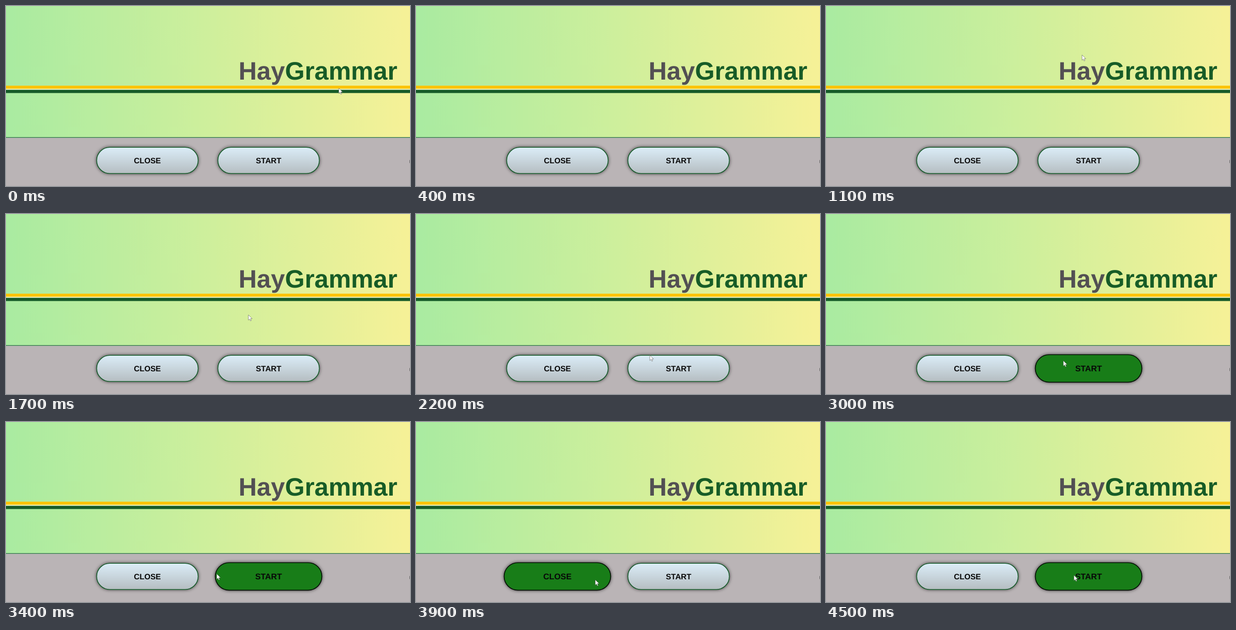
Write an HTML page that moves like this. It is 800x357 px and loops after 4600 ms.

```html
<!DOCTYPE html>
<html lang="en">
<head>
<meta charset="utf-8">
<title>Start screen</title>
<style>
  html, body { margin: 0; width: 100%; height: 100%; overflow: hidden; }
  svg { display: block; width: 100vw; height: 100vh; }
  text { font-family: "Liberation Sans", Arial, sans-serif; font-weight: bold; text-rendering: geometricPrecision; }
  .title { font-size: 50px; }
  .button rect { fill: url(#steel); stroke: #175c2b; stroke-width: 1.6; filter: drop-shadow(0 0 3px rgba(0, 0, 0, .65)); }
  .button text { font-size: 15.5px; text-anchor: middle; fill: #080808; }
  .button.hover rect { fill: #187d18; stroke: #061006; }
</style>
</head>
<body>
<svg viewBox="0 0 800 357">
  <defs>
    <linearGradient id="meadow">
      <stop offset="0" stop-color="#a9eba1"/>
      <stop offset=".5" stop-color="#ceef9c"/>
      <stop offset="1" stop-color="#f6f197"/>
    </linearGradient>
    <linearGradient id="steel" x2="0" y2="1">
      <stop offset="0" stop-color="#dbedf8"/>
      <stop offset="1" stop-color="#b5bdc1"/>
    </linearGradient>
  </defs>
  <rect width="800" height="357" fill="url(#meadow)"/>
  <text class="title" x="460.5" y="146" fill="#525053">Hay</text>
  <text class="title" x="552.5" y="146" fill="#175c27">Grammar</text>
  <rect y="158" width="800" height="6" fill="#fcc40a"/>
  <rect y="164" width="800" height="2.3" fill="#eff2b8"/>
  <rect y="166.3" width="800" height="6.3" fill="#155a28"/>
  <rect y="261" width="800" height="96" fill="#bab4b6"/>
  <rect y="260" width="800" height="1.3" fill="#2f7a48"/>
  <rect x="799.3" y="305.5" width="1" height="6" fill="#444"/>
  <g class="button" data-x="280">
    <rect x="-100.5" y="-26" width="201" height="52" rx="26"/>
    <text y="5.3">CLOSE</text>
  </g>
  <g class="button" data-x="520">
    <rect x="-100.5" y="-26" width="201" height="52" rx="26"/>
    <text y="5.3">START</text>
  </g>
  <path id="cursor" d="M0 0V10.5L2.4 8.3L4 12L5.7 11.3L4.1 7.6H7.5Z" fill="#fff" stroke="#555" stroke-width=".6"/>
</svg>
<script>
  const LOOP = 4600, STEP = 100, BUTTON_Y = 306.3;
  // Pointer path: time, x, y
  const path = [
    [0, 659, 163], [300, 600, -20], [800, 545, -20], [1100, 507, 97],
    [1700, 480, 200], [2200, 463, 280], [2500, 468, 290], [3000, 470, 291],
    [3300, 440, 298], [3600, 372, 308], [3900, 355, 313], [4100, 375, 313],
    [4300, 455, 307], [4500, 491, 304], [LOOP, 491, 304]
  ];
  const cursor = document.getElementById("cursor");
  const buttons = document.querySelectorAll(".button");

  function pointerAt(t) {
    const i = path.findIndex(p => p[0] > t);
    const [t0, x0, y0] = path[i - 1], [t1, x1, y1] = path[i];
    const k = (t - t0) / (t1 - t0);
    return [x0 + (x1 - x0) * k, y0 + (y1 - y0) * k];
  }

  function draw(now) {
    const t = Math.floor(now % LOOP / STEP) * STEP;
    const [x, y] = pointerAt(t);
    cursor.setAttribute("transform", `translate(${x} ${y})`);
    for (const b of buttons) {
      const cx = +b.dataset.x;
      const over = Math.abs(x - cx) < 106 && Math.abs(y - BUTTON_Y) < 26;
      b.classList.toggle("hover", over);
      b.setAttribute("transform", `translate(${cx} ${BUTTON_Y}) scale(${over ? 1.05 : 1})`);
    }
  }

  const start = performance.now();
  function tick() {
    draw(performance.now() - start);
    requestAnimationFrame(tick);
  }
  tick();
</script>
</body>
</html>
```
